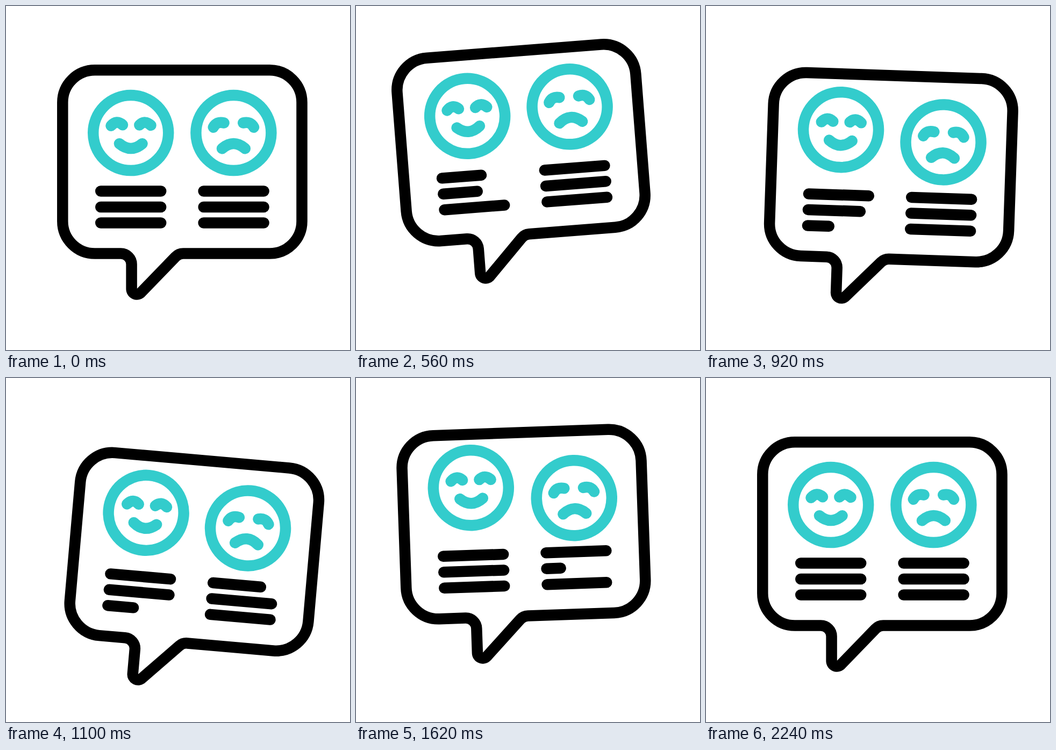
These frames come from a looping animation (640 px wide and 640 px high, 2400 ms). An HTML page:

```html
<!DOCTYPE html>
<html lang="en">
<head>
<meta charset="utf-8">
<title>Feedback bubble</title>
<style>
  html, body { margin: 0; width: 100%; height: 100%; overflow: hidden; background: #fff; }
  svg { display: block; width: 100%; height: 100%; }
  g { fill: none; stroke: #000; stroke-width: 20.5; stroke-linecap: round; stroke-linejoin: round; }
  .face, .face g { stroke: #33cccc; }
</style>
</head>
<body>
<svg viewBox="0 0 640 640">
  <g id="bubble">
    <path d="M165.3 119.3H490.5A60 60 0 0 1 550.5 179.3V400.6A60 60 0 0 1 490.5 460.6H329.8
      A20 20 0 0 0 315.4 466.7L250.6 533.6A10 10 0 0 1 233.6 526.5V480.6
      A20 20 0 0 0 213.6 460.6H165.3A60 60 0 0 1 105.3 400.6V179.3A60 60 0 0 1 165.3 119.3Z"/>
    <g class="face" id="happy">
      <circle cx="232.2" cy="236.1" r="70"/>
      <path d="M195.5 222.8Q206 211 217 221.3M248.3 221.5Q258.5 211.5 269.5 222M211 256.2Q232.2 274 253.5 256.2"/>
    </g>
    <g class="face" id="sad">
      <circle cx="423.4" cy="236.1" r="70"/>
      <path d="M385.8 225.6Q392 214 405.5 217.5M441.3 217.5Q454.8 214 461 225.6M402 265.3Q423.4 246.7 444.8 265.3"/>
    </g>
    <g id="lines"></g>
  </g>
</svg>
<script>
const LOOP = 2400;
const START = 100, STEP = 300;      // shared beat of faces and lines
const FULL = 112, SHORT = 25;       // line lengths
const CX = 328, CY = 290;           // centre of the bubble body
const $ = id => document.getElementById(id);
const clamp = v => Math.min(1, Math.max(0, v));
const smooth = p => p * p * (3 - 2 * p);
const soft = p => 0.8 * smooth(p) + 0.2 * p;

// Smooth curve through [time, value] points, flat at every peak.
function curve(pts) {
  const slope = pts.slice(1).map((b, i) => (b[1] - pts[i][1]) / (b[0] - pts[i][0]));
  const tangent = pts.map((_, i) => {
    const a = slope[i - 1], b = slope[i];
    return a * b > 0 ? 2 * a * b / (a + b) : 0;
  });
  return t => {
    if (t <= pts[0][0]) return pts[0][1];
    const i = pts.findIndex(p => p[0] > t) - 1;
    if (i < 0) return pts[pts.length - 1][1];
    const [t0, v0] = pts[i], [t1, v1] = pts[i + 1];
    const h = t1 - t0, p = (t - t0) / h, q = 1 - p;
    return v0 * (1 - smooth(p)) + v1 * smooth(p)
      + h * p * q * (q * tangent[i] - p * tangent[i + 1]);
  };
}

const shiftX = curve([[65, 0], [340, -6.7], [575, -21], [600, -20.3], [760, 0], [1065, 24],
  [1100, 22.5], [1140, 17.5], [1570, -18], [1620, -16], [1680, -13.7], [1880, -5.2], [2230, 0]]);
const shiftY = curve([[65, 0], [340, -10.9], [590, -36.5], [760, -18], [1115, 33.5],
  [1635, -18], [1880, -8], [2230, 0]]);
const tilt = curve([[65, 0], [340, -2.02], [590, -4.5], [760, -1.97], [1105, 5],
  [1605, -2], [1880, -1.1], [2230, 0]]);

const UP = -18, DOWN = 9;
const happyStops = [0, UP, DOWN, UP, DOWN, UP, DOWN, 0];
const sadStops = [0, DOWN, UP, DOWN, UP, DOWN, UP, 0];

function bob(stops, t) {
  const beat = Math.min(stops.length - 1, Math.max(0, (t - START) / STEP));
  const i = Math.min(stops.length - 2, Math.floor(beat));
  return stops[i] + (stops[i + 1] - stops[i]) * soft(beat - i);
}

const lines = Array.from({ length: 6 }, (_, i) => {
  const el = document.createElementNS("http://www.w3.org/2000/svg", "path");
  $("lines").append(el);
  return { el, x: i < 3 ? 176.2 : 367.6, y: 344.5 + 29.5 * (i % 3), from: START + STEP * i };
});

function draw(t) {
  $("bubble").setAttribute("transform",
    `translate(${shiftX(t)} ${shiftY(t)}) rotate(${tilt(t)} ${CX} ${CY})`);
  $("happy").setAttribute("transform", `translate(0 ${bob(happyStops, t)})`);
  $("sad").setAttribute("transform", `translate(0 ${bob(sadStops, t)})`);
  for (const { el, x, y, from } of lines) {
    const p = clamp((t - from) / (2 * STEP));
    const cut = smooth(1 - Math.abs(2 * p - 1));
    el.setAttribute("d", `M${x} ${y}h${FULL - (FULL - SHORT) * cut}`);
  }
}

function tick() {
  draw(performance.now() % LOOP);
  requestAnimationFrame(tick);
}
tick();
</script>
</body>
</html>
```
